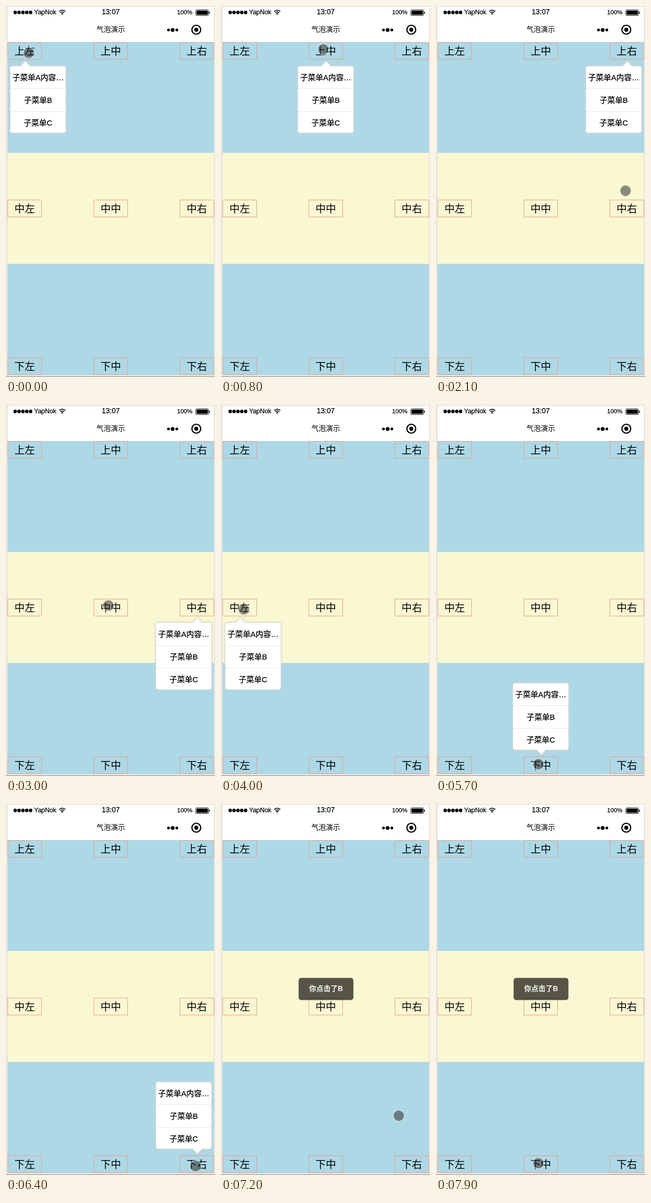
These frames come from a looping animation (408x720 px, 8000 ms). An HTML page:

```html
<!DOCTYPE html>
<html lang="zh-CN">
<head>
<meta charset="utf-8">
<title>气泡演示</title>
<style>
html, body { margin: 0; height: 100%; overflow: hidden; background: #e8e4e0; }
svg { display: block; width: 100%; height: 100%; }
text { font-family: "Liberation Sans", "Noto Sans CJK SC", "Noto Sans CJK", sans-serif; text-anchor: middle; }
.heavy { stroke: #000; stroke-width: .25px; }
#menu { filter: drop-shadow(0 0 2px #d2d2d2) drop-shadow(0 0 1.5px #d2d2d2); }
</style>
</head>
<body>
<svg viewBox="0 0 408 720">
  <path fill="#e8e4e0" d="M0 0H408V720H0z"/>
  <path fill="#fff" d="M3 1H406V70H3z"/>
  <path fill="#d2d0ce" d="M0 0H408V1H0z"/>
  <path fill="#add8e6" d="M3 70H406V716H3z"/>
  <path fill="#faf8d2" d="M3 285H406V500.5H3z"/>
  <path fill="#8d8b89" d="M0 719H408V720H0z"/>

  <path d="M18 12.5h30.1" stroke="#000" stroke-width="6.8" stroke-linecap="round" stroke-dasharray="0 7.5"/>
  <g class="heavy">
    <text x="76.5" y="16" font-size="12.5">YapNok</text>
    <text x="204.5" y="16" font-size="14">13:07</text>
    <text x="349" y="16" font-size="11.8">100%</text>
  </g>
  <path d="M103.8 10.7Q109.8 5.7 115.8 10.7M106 13.2Q109.8 10 113.6 13.2" fill="none" stroke="#000" stroke-width="1.7"/>
  <path d="M107.6 14.7Q109.8 12.9 112 14.7L109.8 17z"/>
  <rect x="370.5" y="7.5" width="25" height="11" rx="2" fill="none" stroke="#000"/>
  <rect x="372" y="9" width="22" height="8" rx="1"/>
  <path d="M396.5 11Q398.5 11.3 398.5 13T396.5 15z"/>

  <text x="204.5" y="50" font-size="14">气泡演示</text>
  <circle cx="317.2" cy="46.5" r="2.7"/><circle cx="325.3" cy="46.5" r="3.8"/><circle cx="333.4" cy="46.5" r="2.7"/>
  <circle cx="371.5" cy="46" r="8.6" fill="none" stroke="#000" stroke-width="2.4"/><circle cx="371.5" cy="46" r="3.9"/>

  <g id="buttons" font-size="20"></g>
  <g id="menu">
    <path id="arrow" fill="#fff"/>
    <rect width="108" height="129" rx="4" fill="#fff"/>
    <path d="M0 43.5H108M0 87.5H108" stroke="#e8e8e8"/>
    <g class="heavy" font-size="15">
      <text x="54" y="27">子菜单A内容…</text>
      <text x="54" y="71">子菜单B</text>
      <text x="54" y="115">子菜单C</text>
    </g>
  </g>
  <g id="toast">
    <rect x="151.5" y="337.5" width="107" height="43" rx="5" opacity=".66"/>
    <text x="205" y="363" font-size="14" font-weight="bold" fill="#f4f4f0">你点击了B</text>
  </g>
  <circle id="cursor" r="10.8" fill="#2a2a2a" fill-opacity=".53" stroke="#fff" stroke-opacity=".5" stroke-width="1.8"/>
</svg>
<script>
const $ = id => document.getElementById(id);
const LOOP = 8000, STEP = 100, BEAT = 800, REST = 100, TRAVEL = 510;
const BUTTONS = 9;

const clamp = (v, lo, hi) => Math.min(hi, Math.max(lo, v));
const ease = p => p * p * (3 - 2 * p);

// Buttons are visited row by row, reversing direction each time
function button(i) {
  const row = Math.floor(i / 3), col = row % 2 ? 2 - i % 3 : i % 3;
  return { row, col, x: 36.5 + 168 * col, y: 70.5 + 306 * row };
}

function menuBox(i) {
  const { row, x, y } = button(i), left = clamp(x - 54, 8.5, 293);
  const below = row < 2;
  return { left, top: below ? y + 46.5 : y - 142.5, tip: x + 1 - left, below };
}

// Where the cursor rests: on each button, then on item B, then on the lower middle button
function stop(i) {
  if (i === BUTTONS) {
    const { left, top } = menuBox(i - 1);
    return [left + 54, top + 65];
  }
  const k = i > BUTTONS ? 7 : i, { col, x, y } = button(k);
  return [x + 8 * Math.cos(2.2 * col), y + 16.5 + 4 * Math.cos(2.4 * k)];
}

$('buttons').innerHTML = Array.from({ length: BUTTONS }, (_, i) => {
  const { row, col, x, y } = button(i);
  return `<rect x="${x - 33}" y="${y}" width="66" height="33" fill="none" stroke="#eb9c82"/>
    <text x="${x}" y="${y + 24}">${'上中下'[row] + '左中右'[col]}</text>`;
}).join('');

function draw(now) {
  const t = Math.floor(now % LOOP / STEP) * STEP;
  const i = Math.floor(t / BEAT), open = i < BUTTONS;
  $('menu').style.display = open ? '' : 'none';
  $('toast').style.display = open ? 'none' : '';
  if (open) {
    const { left, top, tip, below } = menuBox(i);
    $('menu').setAttribute('transform', `translate(${left} ${top})`);
    $('arrow').setAttribute('d', `M${tip - 10} ${below ? 1 : 128}l10 ${below ? -10.5 : 10.5}L${tip + 10} ${below ? 1 : 128}z`);
  }
  const p = ease(clamp((t % BEAT - REST) / TRAVEL, 0, 1));
  const from = stop(i), to = stop(i + 1);
  $('cursor').setAttribute('transform', `translate(${from.map((v, k) => v + (to[k] - v) * p)})`);
}

const start = performance.now();
function tick() {
  draw(performance.now() - start);
  requestAnimationFrame(tick);
}
tick();
</script>
</body>
</html>
```
